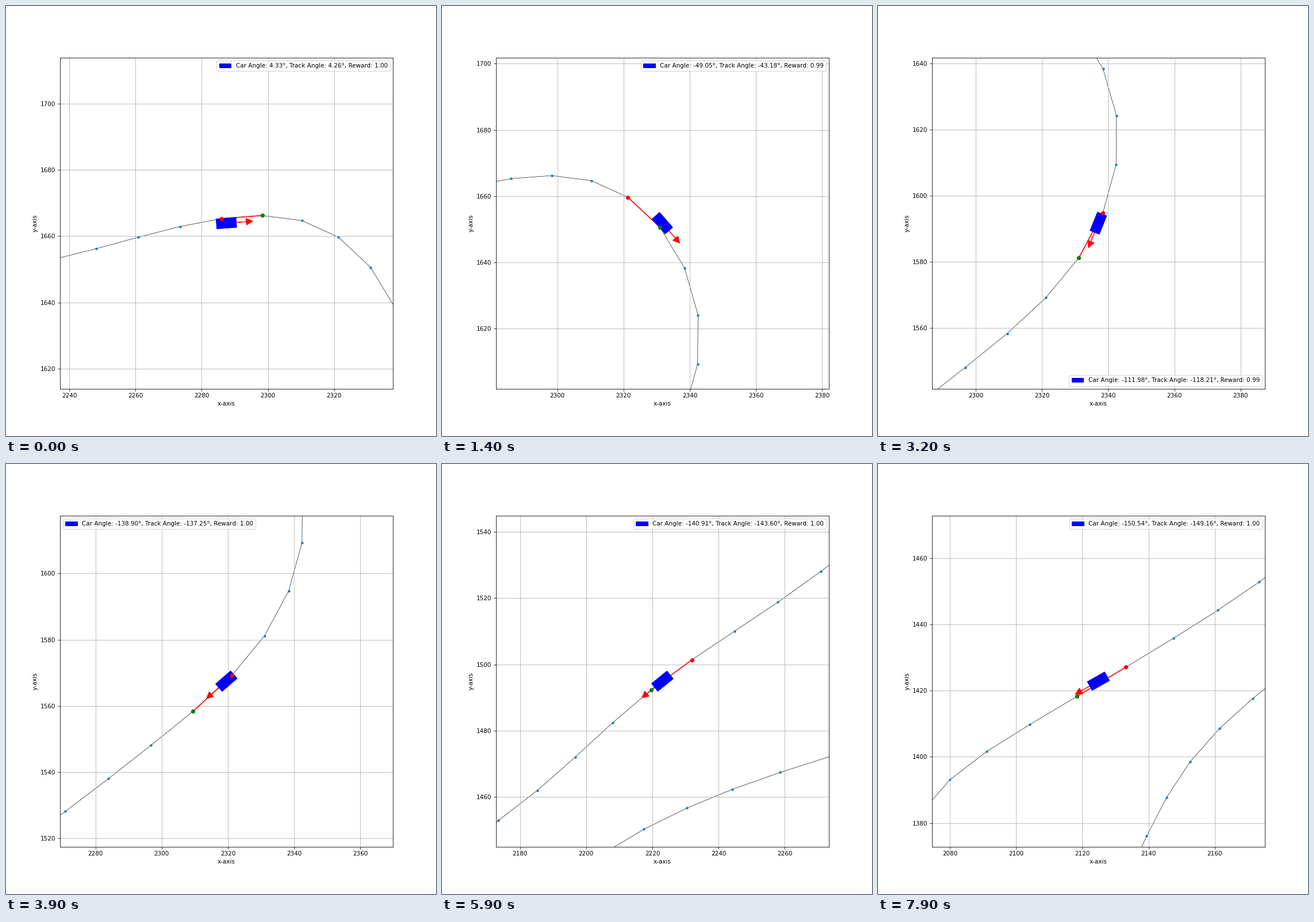
Animation, 748 px wide and 748 px high, one loop 8 s. Source, as a matplotlib script:

```python
import matplotlib.pyplot as plt
import numpy as np
from matplotlib.animation import FuncAnimation
from matplotlib.patches import Rectangle
from matplotlib.ticker import MultipleLocator

FRAMES, INTERVAL = 80, 100
HALF_Y = 50
HALF_X = HALF_Y * 0.775 / 0.77  # keeps the default axes box at equal scale


def waypoints(keys, per_key=3):
    """Points along a natural cubic spline through the keys."""
    keys = np.array(keys, float)
    n = len(keys)
    system = 4 * np.eye(n - 2) + np.eye(n - 2, k=1) + np.eye(n - 2, k=-1)
    bend = np.zeros_like(keys)
    bend[1:-1] = np.linalg.solve(system, 6 * np.diff(keys, 2, axis=0))

    t = np.arange((n - 1) * per_key + 1) / per_key
    i = np.minimum(t.astype(int), n - 2)
    u = (t - i)[:, None]
    return ((1 - u) * keys[i] + u * keys[i + 1]
            - u * (1 - u) / 6 * ((2 - u) * bend[i] + (1 + u) * bend[i + 1]))


# The stretch the car drives, and the neighbouring one
ROAD = waypoints([
    (2209, 1647), (2248.1, 1656.2), (2286, 1665.3), (2321.3, 1659.7),
    (2342.5, 1624.1), (2331.1, 1581.2), (2296.8, 1548.1), (2257.9, 1518.8),
    (2219.6, 1492.3), (2185.3, 1462), (2147.5, 1435.8), (2104.2, 1409.8),
    (2071.5, 1383.3), (2060, 1344)])
FAR_ROAD = waypoints([
    (2358, 1497), (2305.9, 1481.7), (2258.6, 1467.4), (2217.4, 1450.2),
    (2182.3, 1426.3), (2152.6, 1398.6), (2134, 1364)])

# Key poses of the car: step, x, y, heading in degrees
POSES = np.array([
    (0, 2287.46, 1663.92, 4.33),
    (14, 2331.73, 1651.86, -49.05),
    (24, 2342.63, 1620.03, -93.25),
    (39, 2319.54, 1567.46, -138.90),
    (51, 2263.30, 1524.56, -147.99),
    (66, 2189.02, 1467.29, -141.93),
    (79, 2124.85, 1422.87, -150.54)])


def speed(step):
    """Steady through the bend, then accelerating onto the straight."""
    return np.interp(step, [24, 51], [3.4, 6.2])


def unit(deg):
    return np.array([np.cos(np.radians(deg)), np.sin(np.radians(deg))])


def angle_of(v):
    return np.degrees(np.arctan2(v[1], v[0]))


def car_pose(step):
    """Position and heading on a cubic Hermite path through the key poses."""
    k = min(np.searchsorted(POSES[:, 0], step, side="right"), len(POSES) - 1)
    a, b = POSES[k - 1], POSES[k]
    span = b[0] - a[0]
    u = (step - a[0]) / span
    p, q = a[1:3], b[1:3]
    m, n = (span * speed(s[0]) * unit(s[3]) for s in (a, b))
    pos = ((2*u**3 - 3*u**2 + 1) * p + (u**3 - 2*u**2 + u) * m
           + (3*u**2 - 2*u**3) * q + (u**3 - u**2) * n)
    vel = (6*(u**2 - u) * (p - q) + (3*u**2 - 4*u + 1) * m
           + (3*u**2 - 2*u) * n)
    return pos, angle_of(vel)


def road_segment(pos):
    """The closest waypoint and its closer neighbour, in driving order."""
    dist = np.hypot(*(ROAD - pos).T)
    i = int(np.argmin(dist))
    i = i if dist[i + 1] < dist[i - 1] else i - 1
    return ROAD[i], ROAD[i + 1]


fig, ax = plt.subplots(figsize=(10, 10), dpi=74.8)


def draw(step):
    ax.clear()
    pos, heading = car_pose(step)
    start, end = road_segment(pos)
    road_angle = angle_of(end - start)
    reward = np.cos(np.radians(heading - road_angle))

    for road in (ROAD, FAR_ROAD):
        ax.plot(*road.T, color="black", lw=0.6, zorder=1)
        ax.scatter(*road.T, s=10, color="C0", zorder=1)

    ax.plot(*np.array([start, end]).T, color="red", lw=1.5, zorder=2)
    ax.arrow(*pos, *(6 * unit(heading)), head_width=2, head_length=2,
             fc="red", ec="red", zorder=2)
    label = (f"Car Angle: {heading:.2f}°, Track Angle: {road_angle:.2f}°, "
             f"Reward: {reward:.2f}")
    ax.add_patch(Rectangle(pos - (3, 1.5), 6, 3, angle=heading,
                           rotation_point="center", color="blue",
                           zorder=3, label=label))
    for point, color in ((start, "red"), (end, "green")):
        ax.plot(*point, "o", color=color, zorder=4)

    ax.set_xlim(pos[0] - HALF_X, pos[0] + HALF_X)
    ax.set_ylim(pos[1] - HALF_Y, pos[1] + HALF_Y)
    for axis in (ax.xaxis, ax.yaxis):
        axis.set_major_locator(MultipleLocator(20))
    ax.set_xlabel("x-axis")
    ax.set_ylabel("y-axis")
    ax.grid(True)
    ax.legend(loc="best")
    return []


anim = FuncAnimation(fig, draw, frames=FRAMES, interval=INTERVAL,
                     init_func=lambda: [], repeat=True, repeat_delay=0)
plt.show()
```
